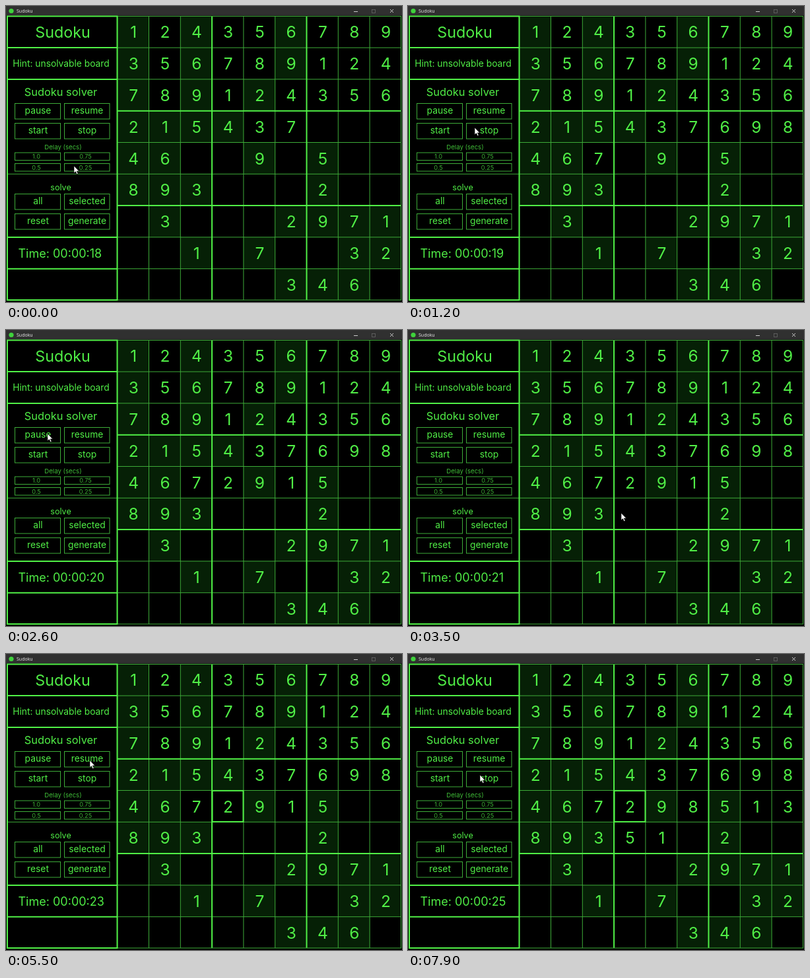
Animation, 600 px wide and 448 px high, one loop 8 s. Source, as an HTML page:

```html
<!DOCTYPE html>
<html lang="en">
<head>
<meta charset="utf-8">
<title>Sudoku</title>
<style>
  html, body { margin: 0; width: 100%; height: 100%; overflow: hidden; background: #000; }
  svg { display: block; width: 600px; height: 448px; }
  text { font-family: Inter, Roboto, sans-serif; fill: #50ee46; }
  .mid { text-anchor: middle; }
  .thin { fill: none; stroke: #3dab38; stroke-width: 1; }
  .bold { fill: none; stroke: #50f046; stroke-width: 2; }
  .given { fill: #062006; }
</style>
</head>
<body>
<svg id="stage" viewBox="0 0 600 448" xmlns="http://www.w3.org/2000/svg"></svg>
<script>
const LOOP = 8000, STEP = 100;
const LEFT = 168.7, TOP = 15.3, PITCH = 47.8;
const stage = document.getElementById("stage");

const board = [
  "124356789", "356789124", "789124356",
  "215437...", "46..9.5..", "893...2..",
  ".3...2971", "..1.7..32", ".....346.",
];
const givens = [
  "1.1..1...", "1.1..1...", "1.1.1....",
  "1111.....", "11..1.1..", "111...1..",
  ".1...1111", "..1.1..11", ".....111.",
];

// [time, row, column, digit]
const moves = [
  [300, 3, 6, 6], [600, 3, 7, 9], [900, 3, 8, 8],
  [1200, 4, 2, 7], [1500, 4, 3, 2], [1800, 4, 5, 1],
  [5700, 4, 5, 8], [6000, 4, 7, 1], [6300, 4, 8, 3],
  [6700, 5, 3, 5], [7000, 5, 4, 1],
];
// [time, row, column]
const selections = [[4000, 5, 4], [4800, 4, 3]];
// [time, x, y]
const pointerPath = [
  [0, 103, 242], [300, 103, 242], [1100, 101, 184], [1300, 101, 184],
  [1900, 63, 157], [2700, 63, 157], [3400, 323, 277], [3600, 323, 277],
  [3900, 375, 277], [4100, 375, 277], [4600, 334, 225], [4900, 334, 225],
  [5500, 127, 161], [6600, 127, 161], [7000, 63, 157], [7300, 63, 157],
  [7900, 109, 183], [8000, 109, 183],
];

const colX = c => LEFT + c * PITCH;
const rowY = r => TOP + r * PITCH;
const label = (x, y, size, text, extra = 'class="mid"') =>
  `<text x="${x}" y="${y}" font-size="${size}" ${extra}>${text}</text>`;
const box = (x, y, w, h, cls, extra = "") =>
  `<rect x="${x}" y="${y}" width="${w}" height="${h}" class="${cls}" ${extra}/>`;
const line = (d, cls) => `<path d="${d}" class="${cls}"/>`;

function titleBar() {
  return `<rect width="600" height="14.5" fill="#303030"/>
    <circle cx="8" cy="7.5" r="3.6" fill="#3fd23c"/>
    ${label(16, 10.2, 7, "Sudoku", 'style="fill:#eee;font-family:\'Open Sans\',sans-serif"')}
    <path d="M527 8.5h6M582 5l5 5m0-5l-5 5" stroke="#ddd" stroke-width=".9"/>
    <rect x="554.5" y="5.5" width="5" height="5" fill="none" stroke="#666" stroke-width=".8"/>`;
}

function sidebar() {
  const button = (col, y, text) =>
    box(col ? 88.5 : 13.5, y, col ? 68.5 : 69, 23.5, "thin") +
    label(col ? 123 : 48.5, y + 15.3, 13.8, text);
  const delay = (col, y, text) =>
    box(col ? 88.5 : 13.5, y, col ? 68.5 : 69, 11.5, "thin") +
    label(col ? 120.5 : 46, y + 9.2, 9.2, text, 'class="mid" opacity=".75"');
  const pairs = [
    [147.5, "pause", "resume"], [177.5, "start", "stop"],
    [284.5, "all", "selected"], [314.5, "reset", "generate"],
  ];
  const delays = [[222, "1.0", "0.75"], [238.5, "0.5", "0.25"]];
  const both = make => ([y, a, b]) => make(0, y, a) + make(1, y, b);
  return label(86, 48, 23.3, "Sudoku") +
    label(83.5, 92, 13.8, "Hint: unsolvable board") +
    label(83, 135.5, 16.4, "Sudoku solver") +
    label(86.5, 216.5, 9.6, "Delay (secs)", 'class="mid" opacity=".8"') +
    label(83, 278.5, 12.6, "solve") +
    pairs.map(both(button)).join("") + delays.map(both(delay)).join("") +
    [1, 2, 5, 7, 8].map(r => line(`M2 ${rowY(r)}H168`, r < 3 || r > 6 ? "bold" : "thin")).join("") +
    box(2, 15.5, 166.5, 429.5, "bold") +
    label(18.5, 380.5, 18, "", 'id="clock"');
}

function grid() {
  let shade = "", thin = "", bold = "", digits = "";
  for (let r = 0; r < 9; r++) {
    for (let c = 0; c < 9; c++) {
      if (givens[r][c] === "1") shade += box(colX(c), rowY(r), PITCH, PITCH, "given");
      digits += label(colX(c) + 24.5, rowY(r) + 33, 24.5, "", `class="mid" id="d${r}${c}"`);
    }
  }
  for (let i = 1; i < 9; i++) {
    const d = `M${colX(i)} 15V445M168 ${rowY(i)}H598.5`;
    if (i % 3) thin += d; else bold += d;
  }
  return shade + line(thin, "thin") + line(bold, "bold") +
    box(LEFT, 15.5, 429.8, 429.5, "thin") +
    box(0, 0, PITCH - 0.8, PITCH - 0.8, "bold", 'id="selection"') + digits;
}

stage.innerHTML = '<rect width="600" height="448"/>' + titleBar() + grid() + sidebar() +
  `<path id="pointer" d="M0 0V10.8L2.5 8.6L4.3 12.6L6.1 11.8L4.3 7.9H7.7Z"
     fill="#fff" stroke="#000" stroke-width=".6"/>`;

const byId = id => document.getElementById(id);
const clock = byId("clock"), selection = byId("selection"), pointer = byId("pointer");

function setText(node, value) {
  if (node.textContent !== value) node.textContent = value;
}

function pointerAt(t) {
  const i = pointerPath.findIndex(p => p[0] > t);
  const [t0, x0, y0] = pointerPath[i - 1], [t1, x1, y1] = pointerPath[i];
  const u = (t - t0) / (t1 - t0), e = u * u * (3 - 2 * u);
  return [x0 + (x1 - x0) * e, y0 + (y1 - y0) * e];
}

function render(t) {
  const state = board.map(row => [...row]);
  for (const [at, r, c, digit] of moves) if (t >= at) state[r][c] = String(digit);
  state.forEach((row, r) => row.forEach((digit, c) =>
    setText(byId(`d${r}${c}`), digit === "." ? "" : digit)));

  setText(clock, "Time: 00:00:" + (18 + Math.floor(t / 1000)));

  const picked = selections.filter(s => t >= s[0]).pop();
  selection.style.display = picked ? "" : "none";
  if (picked) {
    selection.setAttribute("x", colX(picked[2]) + 0.4);
    selection.setAttribute("y", rowY(picked[1]) + 0.4);
  }
  pointer.setAttribute("transform", `translate(${pointerAt(t)})`);
}

function tick() {
  const t = performance.now() % LOOP;
  render(Math.floor(t / STEP) * STEP);
  requestAnimationFrame(tick);
}
tick();
</script>
</body>
</html>
```
